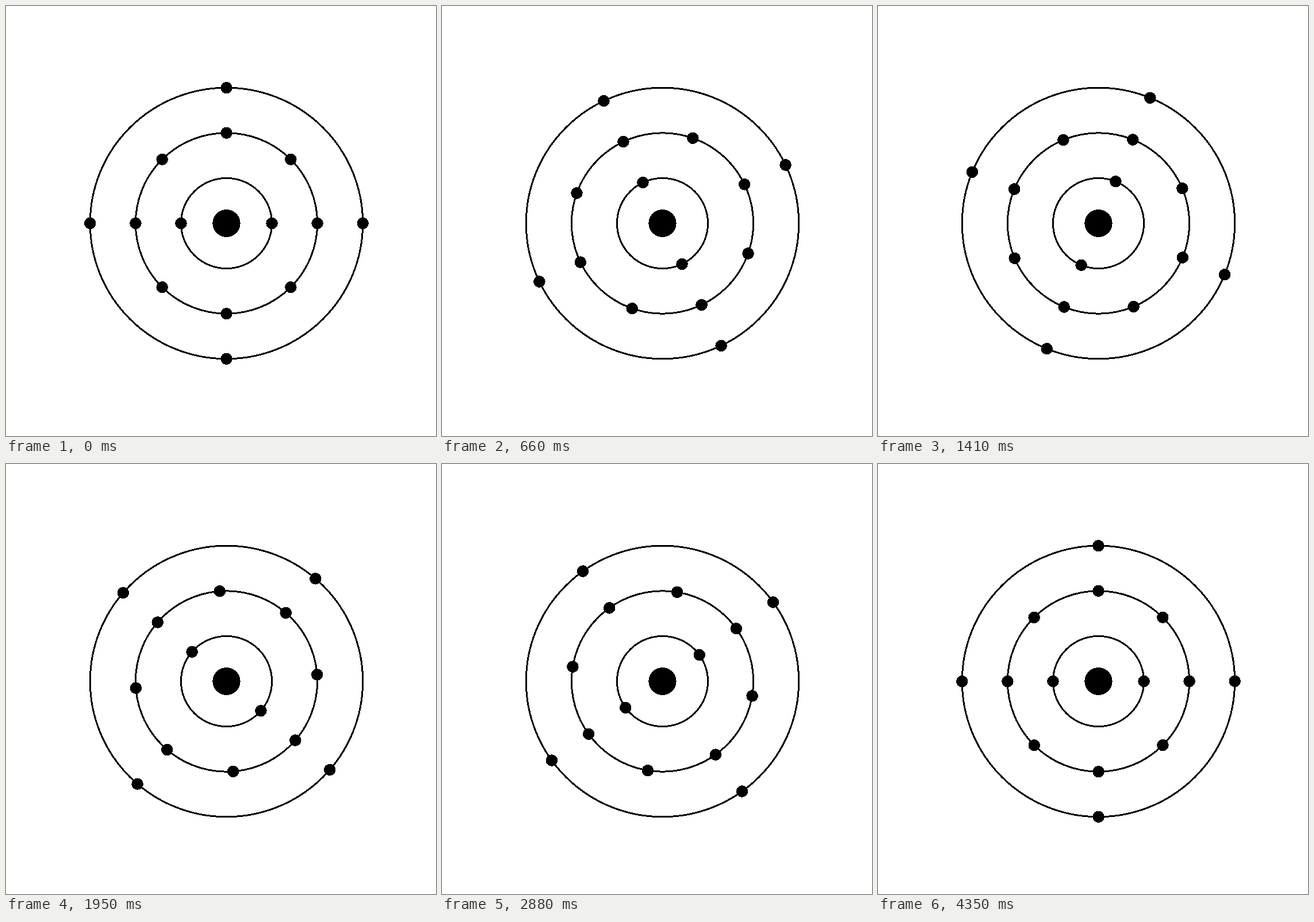
Recreate the animation shown at these times as an HTML page. Size 748 px wide and 748 px high, loop 4.51 s.

```html
<!DOCTYPE html>
<html lang="en">
<head>
<meta charset="utf-8">
<title>Electron shells</title>
<style>
  html, body { margin: 0; width: 100%; height: 100%; overflow: hidden; background: #fff; }
  svg { display: block; width: 748px; height: 748px; }
</style>
</head>
<body>
<svg viewBox="0 0 748 748" shape-rendering="crispEdges">
  <g transform="translate(383.5 378) scale(1.006 1)">
    <g id="rings" fill="none" stroke="#000" stroke-width="3"></g>
    <circle r="24"/>
    <g id="electrons"></g>
  </g>
</svg>
<script>
const LOOP = 4510, STEP = 30, DURATION = 4500, LAST_STEP = 145;
const GAP = 78.6, PIVOT = 0.03, TURN = 720;
const rings = document.getElementById('rings');
const electrons = document.getElementById('electrons');

function circle(parent, x, y, r) {
  const c = document.createElementNS('http://www.w3.org/2000/svg', 'circle');
  c.setAttribute('cx', x);
  c.setAttribute('cy', y);
  c.setAttribute('r', r);
  parent.append(c);
}

[2, 8, 4].forEach((count, shell) => {
  const radius = GAP * (shell + 1);
  circle(rings, 0, 0, radius);
  for (let i = 0; i < count; i++) {
    const a = 2 * Math.PI * i / count;
    circle(electrons, radius * Math.cos(a), radius * Math.sin(a), 10.2);
  }
});

// Short cubic start, long cubic slow-down
function ease(x) {
  return x < PIVOT ? x ** 3 / PIVOT ** 2 : 1 - (1 - x) ** 3 / (1 - PIVOT) ** 2;
}

const start = performance.now();
function draw(now) {
  const time = Math.max(0, now - start) % LOOP;
  const step = Math.min(LAST_STEP, Math.floor(time / STEP));
  electrons.setAttribute('transform', `rotate(${TURN * ease(step * STEP / DURATION)})`);
  requestAnimationFrame(draw);
}
draw(start);
</script>
</body>
</html>
```
